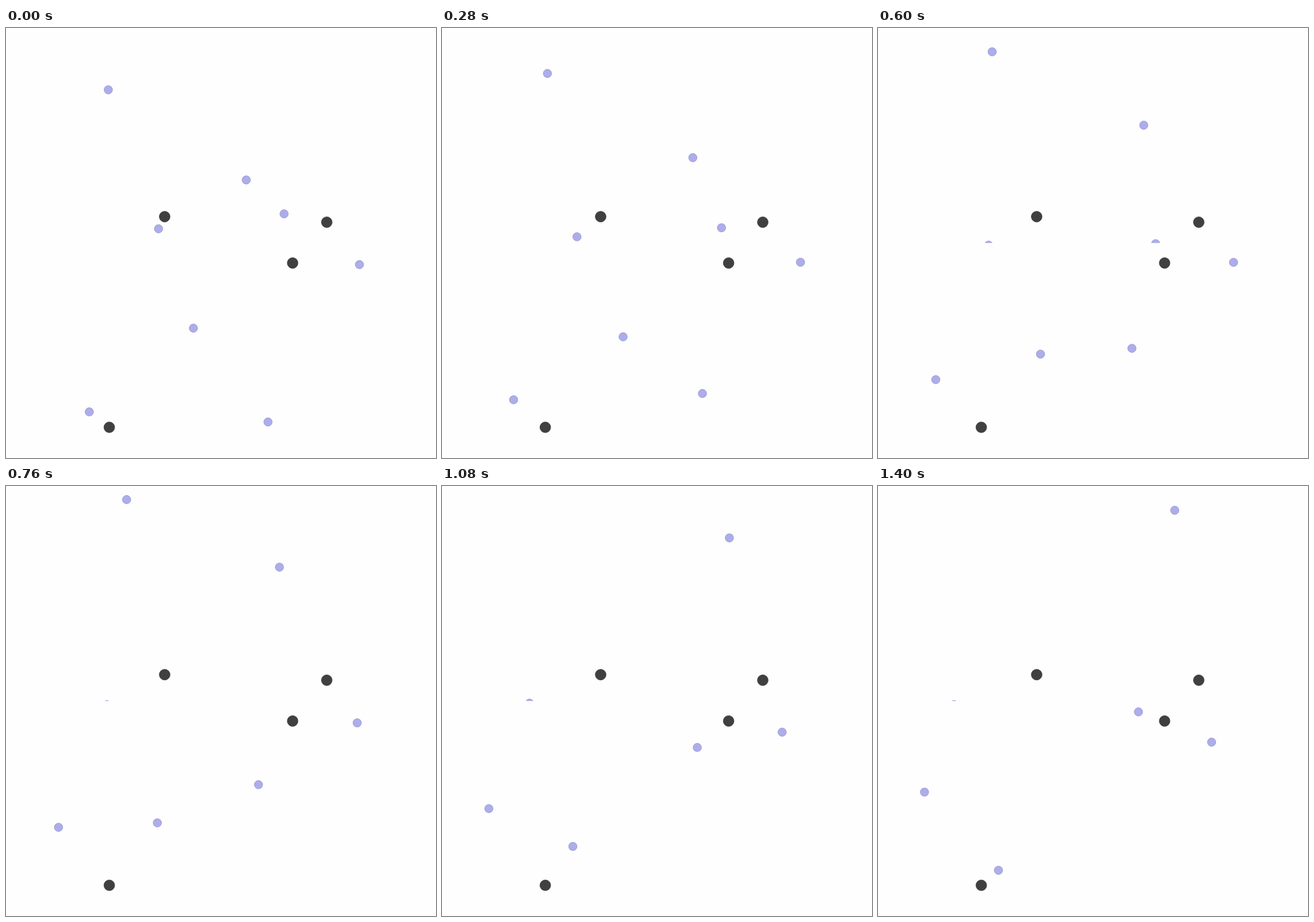
Animation of 748 by 748 pixels, one loop 1.44 s. Source, as an HTML page with a canvas:

```html
<!DOCTYPE html>
<html lang="en">
<head>
<meta charset="utf-8">
<title>Drifting dots</title>
<style>
html, body { margin: 0; width: 100%; height: 100%; overflow: hidden; background: #fefefe; }
canvas { display: block; width: 748px; height: 748px; }
</style>
</head>
<body>
<canvas id="stage" width="748" height="748"></canvas>
<script>
const SIZE = 748, HALF = SIZE / 2, LOOP = 1440, STEP = 40;
const ctx = document.getElementById('stage').getContext('2d');

const poly = (...k) => u => k.reduceRight((sum, c) => sum * u + c, 0);

// Smooth drift: place, speed, acceleration and so on at u = 0
const phase = t => (t - 600) / 160;
const dots = [
  { x: poly(198.6, 10, 1.2), y: poly(41.4, -18.35, 0.55, 0.1, -0.026) },
  { x: poly(192.4, -19.05, 1.756, 0.2215, -0.0583), y: poly(377.8, 4.41, -1.754, -0.0534, 0.0497) },
  { x: poly(462.3, 13.48, 0.02, -0.1122), y: poly(169.1, -28.51, 0.418, 0.209, -0.0334) },
  { x: poly(483, -3.2, -0.8), y: poly(375.2, 13.85) },
  { x: poly(282.7, -19.01, -0.764, 0.3278), y: poly(567.3, 17.68, 1.079, -0.1136) },
  { x: poly(100.5, -10.41, 1.155, 0.13, -0.0203), y: poly(611.7, -18.18, 0.102, 0.178, -0.021) },
  { x: poly(618.5, -6.19, -1.568, 0.162, 0.0187), y: poly(407.7, 2.8, 1.513, 0.027, -0.0277) },
  { x: poly(441.7, -4.09, 1.418, 0.217, -0.0492), y: poly(557.2, -39.1, 1.163, 0.3855, -0.0736) }
];
const posts = [[276, 328.2], [558, 337.8], [498.6, 408.8], [179.7, 694.6]];

function circle(x, y, r, fill, edge) {
  ctx.beginPath();
  ctx.arc(x, y, r, 0, 2 * Math.PI);
  ctx.fillStyle = fill;
  ctx.fill();
  ctx.strokeStyle = edge;
  ctx.stroke();
}

const quadrant = v => v < HALF ? 0 : HALF;

// Every dot is confined to the quadrant it starts in.
function drawDot({ x, y }, t) {
  const start = phase(0), u = phase(t);
  ctx.save();
  ctx.beginPath();
  ctx.rect(quadrant(x(start)), quadrant(y(start)), HALF, HALF);
  ctx.clip();
  circle(x(u), y(u), 7.3, '#adadeb', '#8c8cc4');
  ctx.restore();
}

function draw(now) {
  const t = Math.floor((now % LOOP) / STEP) * STEP;
  ctx.fillStyle = '#fefefe';
  ctx.fillRect(0, 0, SIZE, SIZE);
  ctx.lineWidth = 0.75;
  for (const dot of dots) drawDot(dot, t);
  for (const [x, y] of posts) circle(x, y, 9.4, '#404040', '#383838');
}

let start;
function tick(now) {
  start ??= now;
  draw(Math.max(0, now - start));
  requestAnimationFrame(tick);
}
draw(0);
requestAnimationFrame(tick);
</script>
</body>
</html>
```
